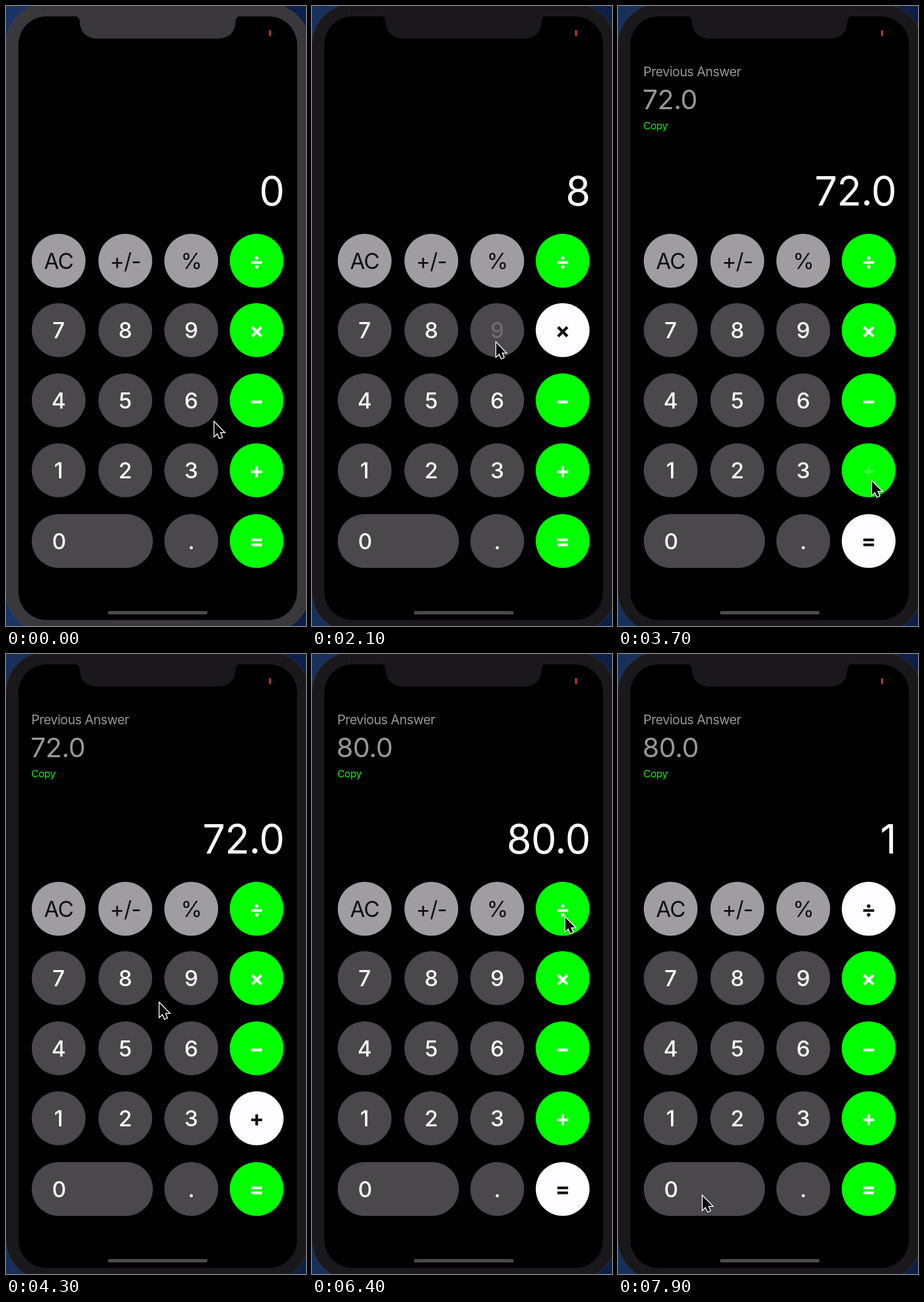
Animation of 521 by 1075 pixels, one loop 8 s. Source, as an HTML page with a canvas:

```html
<!DOCTYPE html>
<html lang="en">
<head>
<meta charset="utf-8">
<title>Calculator</title>
<style>
  html, body { margin: 0; width: 100%; height: 100%; overflow: hidden; background: #000; }
  canvas { display: block; }
</style>
</head>
<body>
<canvas id="stage" width="521" height="1075"></canvas>
<script>
const ctx = document.getElementById('stage').getContext('2d');
const LOOP = 8000, FOCUS_AT = 600, BOUNCE = 300;
const RADIUS = 46.7;
const COLS = [91.4, 207.2, 321.7, 435.3];
const ROWS = [441.8, 562, 683.7, 805, 927.6];
const KEYS = [
  ['AC', '+/-', '%', '÷'],
  ['7', '8', '9', '×'],
  ['4', '5', '6', '−'],
  ['1', '2', '3', '+'],
  ['0', '', '.', '=']
];

// Each tap: finger down, finger up, key, and the state that follows.
const TAPS = [
  { down: 740, up: 830, key: '8', display: '8' },
  { down: 1300, up: 1400, key: '×', active: '×' },
  { down: 2060, up: 2150, key: '9', display: '9', active: '' },
  { down: 2890, up: 2986, key: '=', display: '72.0', active: '=', answer: '72.0' },
  { down: 3700, up: 3800, key: '+', active: '+' },
  { down: 4540, up: 4640, key: '8', display: '8' },
  { down: 5440, up: 5540, key: '=', display: '80.0', active: '=', answer: '80.0' },
  { down: 6440, up: 6540, key: '÷', active: '÷' },
  { down: 7240, up: 7340, key: '1', display: '1' }
];

// Pointer tip: time, x, y
const PATH = [
  [0, 361, 720], [540, 207, 588], [830, 207, 588], [1105, 435, 579],
  [1500, 435, 579], [1900, 319, 582], [2200, 319, 582], [2750, 432, 920],
  [3080, 432, 920], [3600, 440, 822], [3950, 440, 822], [4472, 207, 530],
  [4740, 207, 530], [5300, 434, 920], [5700, 434, 920], [6380, 439, 455],
  [6640, 439, 455], [7140, 95, 812], [7420, 95, 812], [7880, 146, 938], [LOOP, 146, 938]
];

const smooth = u => u * u * (3 - 2 * u);

function pointerAt(t) {
  const i = PATH.findIndex(p => p[0] > t);
  const [t0, x0, y0] = PATH[i - 1], [t1, x1, y1] = PATH[i];
  const u = smooth((t - t0) / (t1 - t0));
  return [x0 + (x1 - x0) * u, y0 + (y1 - y0) * u];
}

function stateAt(t) {
  const state = { display: '0', active: '', answer: '' };
  for (const { up, display, active, answer } of TAPS) {
    if (up > t) break;
    state.display = display ?? state.display;
    state.active = active ?? state.active;
    state.answer = answer ?? state.answer;
  }
  return state;
}

// A held key dims its label; on release the whole key dips and recovers.
function pressAt(key, t) {
  const tap = TAPS.find(p => p.key === key && t >= p.down && t < p.up + BOUNCE);
  if (!tap) return { scale: 1, alpha: 1 };
  const u = Math.max(0, (t - tap.up) / BOUNCE);
  return { scale: 1 - 0.25 * Math.sin(Math.PI * u) ** 2, alpha: 0.2 + 0.8 * u };
}

function roundRect(x, y, w, h, r, fill) {
  ctx.beginPath();
  ctx.roundRect(x, y, w, h, r);
  ctx.fillStyle = fill;
  ctx.fill();
}

function text(str, x, y, size, fill, { weight = 400, align = 'left', spacing = 0 } = {}) {
  ctx.font = `${weight} ${size}px Inter, sans-serif`;
  ctx.letterSpacing = spacing + 'px';
  ctx.textAlign = align;
  ctx.fillStyle = fill;
  ctx.fillText(str, x, y);
}

function drawPhone(focused) {
  const bezel = focused ? '#1a181a' : '#3a383a';
  const desktop = ctx.createLinearGradient(0, 0, 521, 0);
  desktop.addColorStop(0, focused ? '#18305c' : '#1b3565');
  desktop.addColorStop(1, '#0c1f48');
  ctx.fillStyle = desktop;
  ctx.fillRect(0, 0, 521, 1075);

  roundRect(-0.5, -4, 528, 1090, 72, bezel);
  ctx.strokeStyle = focused ? '#343234' : '#464446';
  ctx.lineWidth = 1;
  ctx.stroke();
  ctx.fillStyle = 'rgba(0,0,0,.22)';
  ctx.fillRect(68, 0, 1, 18);
  ctx.fillRect(68, 1064, 1, 11);

  roundRect(21.5, 18, 484, 1046.5, 49, '#000');
  ctx.beginPath();
  ctx.moveTo(118, 17);
  ctx.quadraticCurveTo(128, 18, 128, 28);
  ctx.bezierCurveTo(129, 46, 141, 56.5, 160, 56.5);
  ctx.lineTo(367, 56.5);
  ctx.bezierCurveTo(386, 56.5, 398, 46, 398.5, 28);
  ctx.quadraticCurveTo(398.5, 18, 408, 17);
  ctx.fillStyle = bezel;
  ctx.fill();

  roundRect(457, 42, 3, 10, 1, '#d83a32');
  roundRect(177, 1049, 173, 6, 3, '#4b4a4c');
}

function drawKey(key, col, row, t, active) {
  const wide = key === '0', operator = col === 3;
  const cx = COLS[col], cy = ROWS[row];
  const { scale, alpha } = pressAt(key, t);
  const lit = key === active;
  const fill = operator ? (lit ? '#fdfcff' : '#00ff00') : row === 0 ? '#9f9d9f' : '#4a484b';
  const ink = lit || (row === 0 && !operator) ? '#111' : '#fff';
  const pivot = wide ? 150 : cx;

  ctx.save();
  ctx.translate(pivot, cy);
  ctx.scale(scale, scale);
  ctx.translate(-pivot, -cy);
  roundRect(cx - RADIUS, cy - RADIUS, wide ? 210.4 : 2 * RADIUS, 2 * RADIUS, RADIUS, fill);
  ctx.globalAlpha = alpha;
  if (operator) {
    ctx.font = '700 38px Inter, sans-serif';
    ctx.textAlign = 'center';
    const box = ctx.measureText(key);
    const drop = (box.actualBoundingBoxAscent - box.actualBoundingBoxDescent) / 2;
    text(key, cx, cy + 2.7 + drop, 38, ink, { weight: 700, align: 'center' });
  } else {
    text(key, cx + (wide ? 0.8 : 0), cy + 14, 38, ink, {
      weight: row ? 500 : 400, align: 'center', spacing: row ? 0 : -1
    });
  }
  ctx.restore();
}

function drawPointer(x, y) {
  ctx.save();
  ctx.translate(x + 1, y + 2);
  ctx.beginPath();
  [[0, 0], [0, 23.5], [5.3, 18.6], [9, 27], [13, 25.3], [9.4, 17], [16.6, 17]]
    .forEach(p => ctx.lineTo(...p));
  ctx.closePath();
  ctx.shadowColor = 'rgba(0,0,0,.4)';
  ctx.shadowBlur = 3;
  ctx.shadowOffsetY = 1;
  ctx.lineWidth = 3;
  ctx.strokeStyle = '#fff';
  ctx.stroke();
  ctx.shadowColor = 'transparent';
  ctx.fillStyle = '#000';
  ctx.fill();
  ctx.restore();
}

function draw(t) {
  const { display, active, answer } = stateAt(t);
  drawPhone(t >= FOCUS_AT);
  if (answer) {
    text('Previous Answer', 44, 122, 22.5, '#989698', { spacing: -0.6 });
    text(answer, 42.5, 178.5, 47, '#989698', { spacing: -0.5 });
    text('Copy', 44, 214, 17.5, '#0cf00c', { spacing: -0.4 });
  }
  text(display, 483, 345.5, 70, '#fff', { align: 'right', spacing: -0.8 });
  KEYS.forEach((keys, row) => keys.forEach((key, col) => {
    if (key) drawKey(key, col, row, t, active);
  }));
  drawPointer(...pointerAt(t));
}

const start = performance.now();
function frame() {
  draw((performance.now() - start) % LOOP);
  requestAnimationFrame(frame);
}
frame();
</script>
</body>
</html>
```
